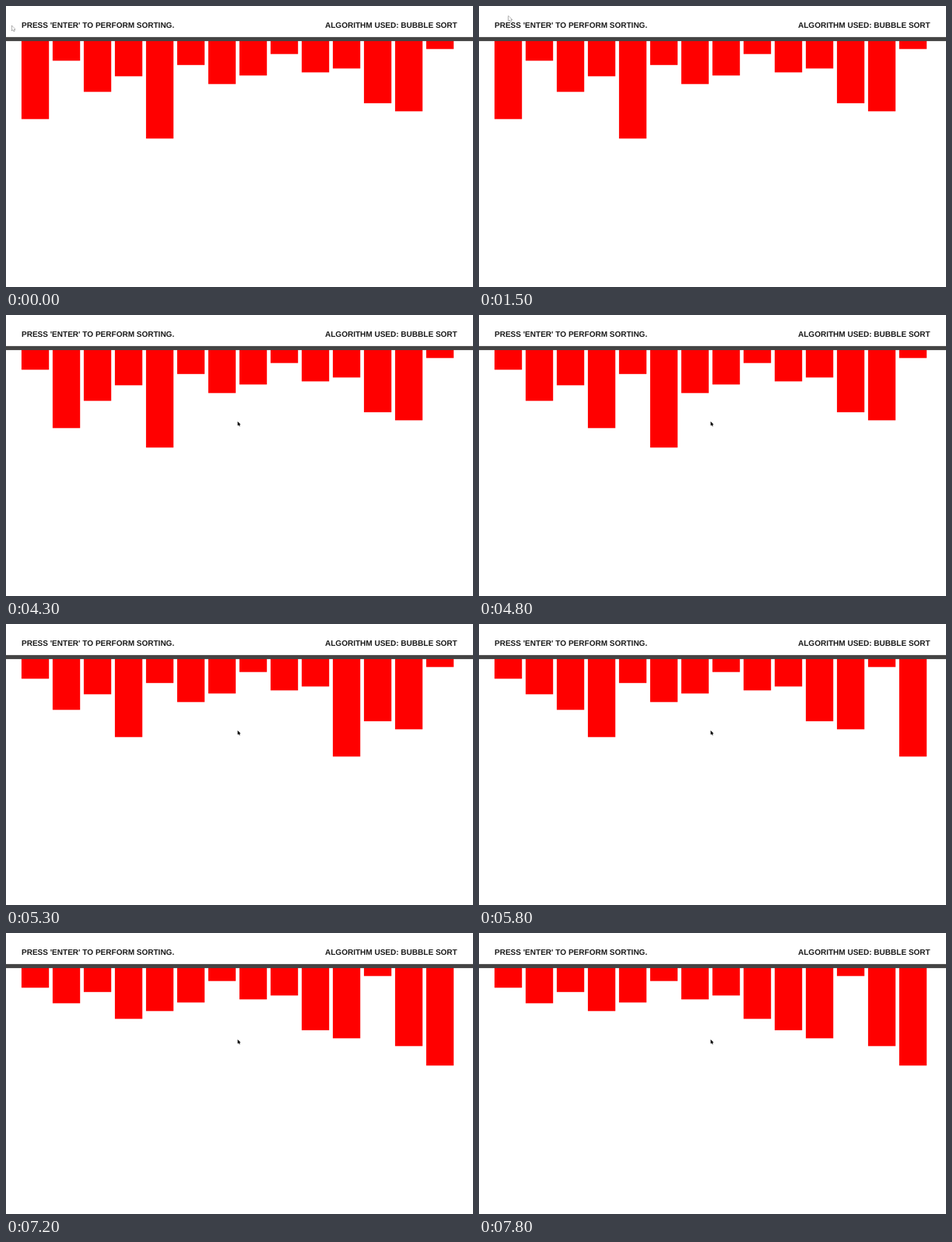
Recreate the animation shown at these times as an HTML page with a canvas. Size 600 by 361 pixels, loop 8 s.

```html
<!DOCTYPE html>
<html lang="en">
<head>
<meta charset="utf-8">
<title>Bubble sort</title>
<style>
html, body { margin: 0; width: 100%; height: 100%; overflow: hidden; background: #fff; }
canvas { display: block; }
</style>
</head>
<body>
<canvas id="stage" width="600" height="361"></canvas>
<script>
const ctx = document.getElementById('stage').getContext('2d');
const LOOP = 8000, TICK = 100, SORT_START = 4300;
const heights = [100, 25, 65, 45, 125, 30.5, 55, 44, 16.4, 40, 35, 79.6, 90, 10];

const clamp = v => Math.max(0, Math.min(1, v));
const mix = (a, b, u) => a + (b - a) * u;
const easeOut = (u, power) => 1 - (1 - u) ** power;

// Fourteen comparisons happen in every fifteen ticks.
function stepsAt(t) {
  if (t < SORT_START) return 0;
  const k = Math.floor((t - SORT_START) / TICK);
  return k + 1 - Math.floor((k + 11) / 15);
}

function sortedAfter(steps) {
  const a = heights.slice();
  for (let end = a.length - 1; end > 0; end--) {
    for (let j = 0; j < end; j++) {
      if (steps-- <= 0) return a;
      if (a[j] > a[j + 1]) [a[j], a[j + 1]] = [a[j + 1], a[j]];
    }
  }
  return a;
}

// Arrow head with a slanted tail, tip at (x, y)
function arrow(x, y, size, fill, stroke) {
  ctx.save();
  ctx.translate(x, y);
  ctx.scale(size, size);
  const shape = new Path2D('M0 0V7L1.6 5.6L2.8 8L3.9 7.5L2.9 5.2H5Z');
  ctx.strokeStyle = stroke;
  ctx.stroke(shape);
  ctx.fillStyle = fill;
  ctx.fill(shape);
  ctx.restore();
}

function drawPointer(t) {
  const now = Math.floor(t / TICK) * TICK;
  if (now < 2300) {
    // Rises slowly, then swoops down to the right
    const u = clamp((now - 900) / 1200);
    arrow(mix(7.5, 205.5, u ** 2.7), 25.3 - 28 * u + 95 * u ** 6, 0.9, '#fff', '#555');
  } else if (now >= 2600) {
    const u = clamp((now - 2600) / 800);
    arrow(mix(256, 297.6, easeOut(u, 5)), mix(5, 136.7, easeOut(u, 1.75)), 0.8, '#000', '#fff');
  }
}

function draw(t) {
  ctx.fillStyle = '#fff';
  ctx.fillRect(0, 0, 600, 361);

  ctx.fillStyle = '#f00';
  sortedAfter(stepsAt(t)).forEach((h, i) => ctx.fillRect(19.9 + 40 * i, 45, 35.3, h + 0.3));

  ctx.fillStyle = '#444';
  ctx.fillRect(0, 39.9, 600, 5.2);

  ctx.fillStyle = '#1a1a1a';
  ctx.font = 'bold 10.03px "Liberation Sans", Arial, sans-serif';
  ctx.fontKerning = 'none';
  ctx.textRendering = 'geometricPrecision';
  ctx.fillText("PRESS 'ENTER' TO PERFORM SORTING.", 20, 28.1);
  ctx.fillText('ALGORITHM USED: BUBBLE SORT', 410, 28.1);

  drawPointer(t);
}

const start = performance.now();
function frame() {
  draw((performance.now() - start) % LOOP);
  requestAnimationFrame(frame);
}
frame();
</script>
</body>
</html>
```
